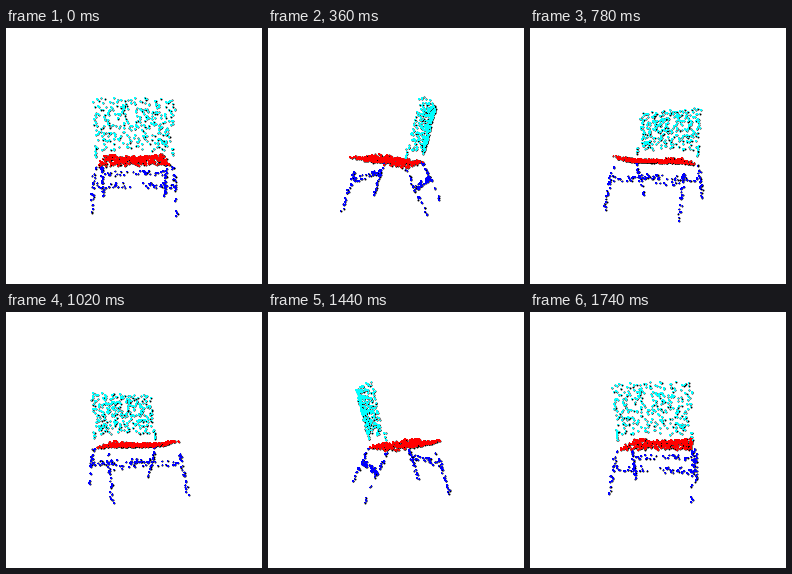
Recreate the animation shown at these times as a matplotlib script. Size 256 by 256 pixels, loop 1.8 s.

```python
import numpy as np
import matplotlib.pyplot as plt
from matplotlib.animation import FuncAnimation

SIZE, DPI = 256, 100
FRAMES, INTERVAL = 30, 60
CENTER = 128
DIST = 240      # camera distance
TILT = 0.04     # slight look from above

CYAN, RED, BLUE = (0, 1, 1), (1, 0, 0), (0, 0, 1)
rng = np.random.default_rng(7)


def uni(lo, hi, n):
    return rng.uniform(lo, hi, n)


def backrest(n):
    """Leaning panel, bowed backwards in the middle."""
    u, t = uni(-1, 1, n), uni(0, 1, n) ** 0.9
    y = 21 + 12 * t + 4 * (1 - u**2) + uni(-1.5, 1.5, n)
    return np.column_stack([36 * u, y, -5 - 46 * t])


def post(side, n):
    t = uni(0, 1, n)
    return np.column_stack([side * 35 + uni(-1, 1, n), 20 + 2 * t, -8 * t])


def seat(n):
    """Tapered seat, dished at the front, drooping at the back corners."""
    u, t = uni(-1, 1, n), uni(0, 1, n)
    x = u * (32 + 3 * t)
    y = -37 + 58 * t
    dish = 3.5 * (1 - u**2) * (1 - t) + 2 * u**4 * t
    h = -1 + 8 * t + dish + uni(-1.6, 1.6, n)
    return np.column_stack([x, y, h])


def leg(side, top, foot, n):
    t = uni(0, 1, n) ** 1.15
    x = side * 36 + uni(-1.3, 1.3, n)
    y = top + (foot - top) * t + uni(-1.3, 1.3, n)
    return np.column_stack([x, y, 9 + 40 * t])


def rail(y, h, n):
    return np.column_stack([uni(-34, 34, n), y + uni(-1, 1, n),
                            h + uni(-2.8, 2.8, n)])


parts = [(backrest(320), CYAN), (post(-1, 5), CYAN), (post(1, 5), CYAN),
         (seat(420), RED), (rail(-30, 20.5, 34), BLUE), (rail(28, 25, 44), BLUE)]
for side in (-1, 1):
    parts.append((leg(side, 20, 39, 27), BLUE))
    parts.append((leg(side, -26, -40, 27), BLUE))

points = np.vstack([p for p, _ in parts])
colors = np.vstack([np.tile(c, (len(p), 1)) for p, c in parts])


def project(angle):
    """Screen positions sorted from far to near, with the sort order."""
    x, y, h = points.T
    c, s = np.cos(angle), np.sin(angle)
    depth = y * c - x * s
    scale = DIST / (DIST - depth)
    sx = CENTER + scale * (x * c + y * s)
    sy = CENTER + scale * (h + TILT * depth)
    order = np.argsort(depth)
    return np.column_stack([sx, sy])[order], order


fig = plt.figure(figsize=(SIZE / DPI, SIZE / DPI), dpi=DPI, facecolor="white")
ax = fig.add_axes([0, 0, 1, 1])
ax.set_xlim(0, SIZE)
ax.set_ylim(SIZE, 0)
ax.axis("off")


def dots(width, color):
    n = len(points)
    return ax.scatter(np.zeros(n), np.zeros(n), s=(width * 72 / DPI) ** 2,
                      c=color, linewidths=0, antialiased=False)


rims = dots(2.0, "black")
fills = dots(0.8, colors)


def update(i):
    pos, order = project(2 * np.pi * i / FRAMES)
    rims.set_offsets(pos)
    fills.set_offsets(pos)
    fills.set_facecolor(colors[order])
    return rims, fills


anim = FuncAnimation(fig, update, frames=FRAMES, interval=INTERVAL,
                     repeat=True, repeat_delay=0)
plt.show()
```
